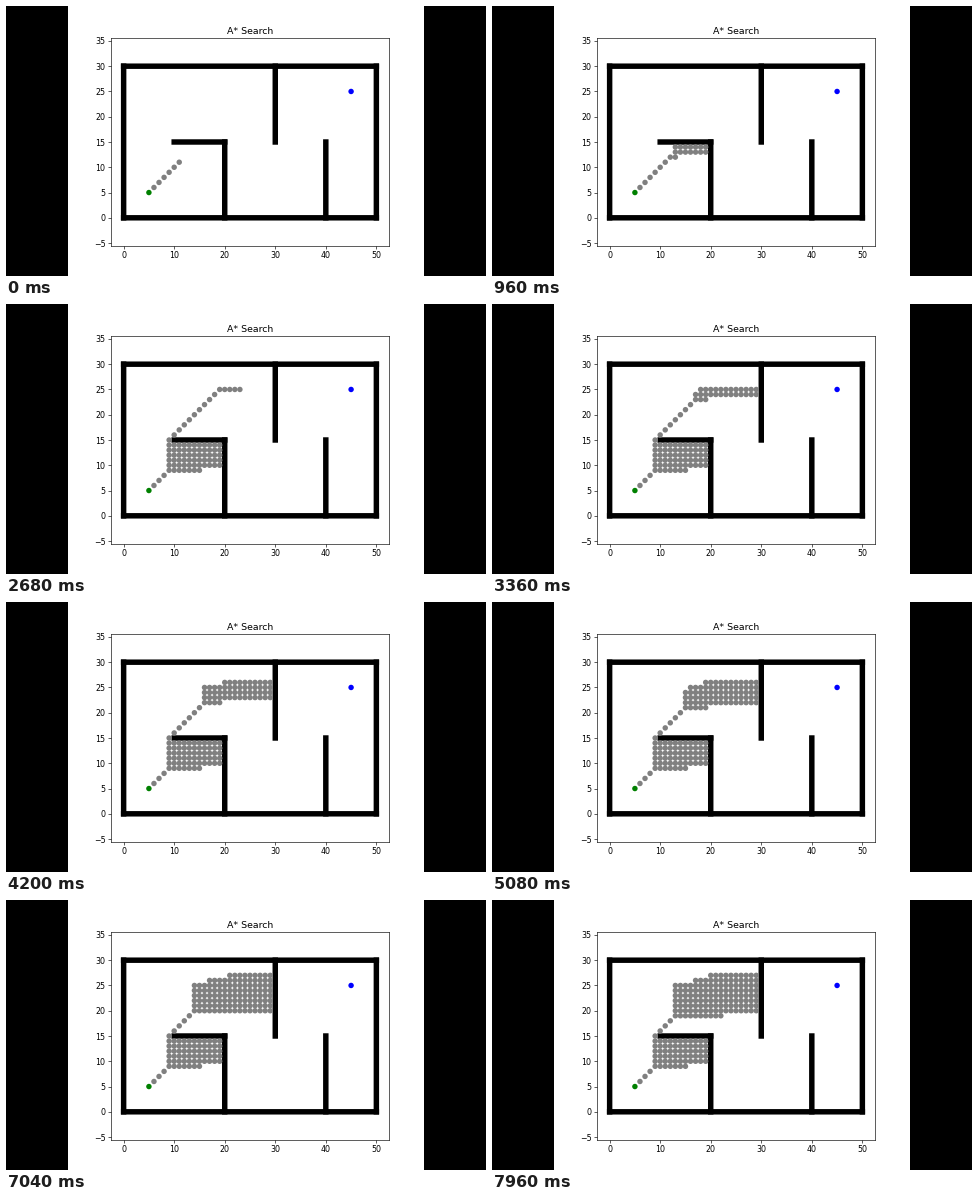
A matplotlib script that plays this animation: 480 by 270 pixels, repeating every 8 s.

```python
import math

import numpy as np
import matplotlib.pyplot as plt
from matplotlib.animation import FuncAnimation
from matplotlib.collections import PatchCollection
from matplotlib.patches import Circle, Rectangle

W, H, DPI = 480, 270, 56.25
STEP, FRAMES = 40, 200
START, GOAL = (5, 5), (45, 25)
R = 0.54  # half a marker, in grid cells

# Walls as inclusive cell ranges: x0, y0, x1, y1
WALLS = [(0, 0, 50, 0), (0, 30, 50, 30), (0, 0, 0, 30), (50, 0, 50, 30),
         (10, 15, 20, 15), (20, 0, 20, 15), (30, 15, 30, 30), (40, 0, 40, 15)]
MOVES = [(1, 0), (0, 1), (-1, 0), (0, -1), (-1, -1), (-1, 1), (1, -1), (1, 1)]

# Cells explored by a given time (ms); flat stretches are pauses
PACE = [(480, 6), (1760, 50), (2680, 80), (4200, 128), (4520, 138),
        (4640, 138), (4680, 139), (4880, 139), (5080, 146), (5480, 158),
        (5760, 158), (6280, 171), (7040, 188), (7280, 188), (7960, 204)]


def explore(limit):
    """Cells in the order A* expands them; ties go first in, first out."""
    blocked = {(x, y) for x0, y0, x1, y1 in WALLS
               for x in range(x0, x1 + 1) for y in range(y0, y1 + 1)}
    cost, queue, closed = {START: 0.0}, {START: 0.0}, []
    while queue and len(closed) <= limit:
        cell = min(queue, key=queue.get)
        del queue[cell]
        closed.append(cell)
        if cell == GOAL:
            break
        for dx, dy in MOVES:
            nxt = (cell[0] + dx, cell[1] + dy)
            if nxt in blocked or nxt in closed:
                continue
            g = cost[cell] + math.hypot(dx, dy)
            if g + 1e-9 < cost.get(nxt, math.inf):
                cost[nxt] = g
                queue.pop(nxt, None)
                h = abs(GOAL[0] - nxt[0]) + abs(GOAL[1] - nxt[1])
                queue[nxt] = round(g + h, 6)
    return closed[1:]


fig = plt.figure(figsize=(W / DPI, H / DPI), dpi=DPI, facecolor="white")
for left, right in ((0, 62), (418, W)):
    fig.add_artist(Rectangle((left / W, 0), (right - left) / W, 1,
                             transform=fig.transFigure, color="black", lw=0))

ax = fig.add_axes([105 / W, 30.4 / H, 278 / W, 207.2 / H])
ax.set_xlim(-2.5, 52.5)
ax.set_ylim(-5.5, 35.5)
ax.set_xticks(range(0, 51, 10))
ax.set_yticks(range(-5, 36, 5))
ax.set_title("A* Search")

for x0, y0, x1, y1 in WALLS:
    ax.add_patch(Rectangle((x0 - R, y0 - R), x1 - x0 + 2 * R, y1 - y0 + 2 * R,
                           color="black", lw=0, snap=False, zorder=3))
for cell, color in ((START, "green"), (GOAL, "blue")):
    ax.add_patch(Circle(cell, R, color=color, lw=0, zorder=3))

dots = [Circle(cell, R) for cell in explore(PACE[-1][1])]
visited = PatchCollection(dots[:1], facecolor="gray", linewidth=0, zorder=4)
ax.add_collection(visited, autolim=False)
times, counts = zip(*PACE)


def draw(i):
    n = int(round(float(np.interp(i * STEP, times, counts))))
    visited.set_paths(dots[:n])
    return [visited]


anim = FuncAnimation(fig, draw, frames=FRAMES, interval=STEP,
                     repeat=True, repeat_delay=0)
plt.show()
```
